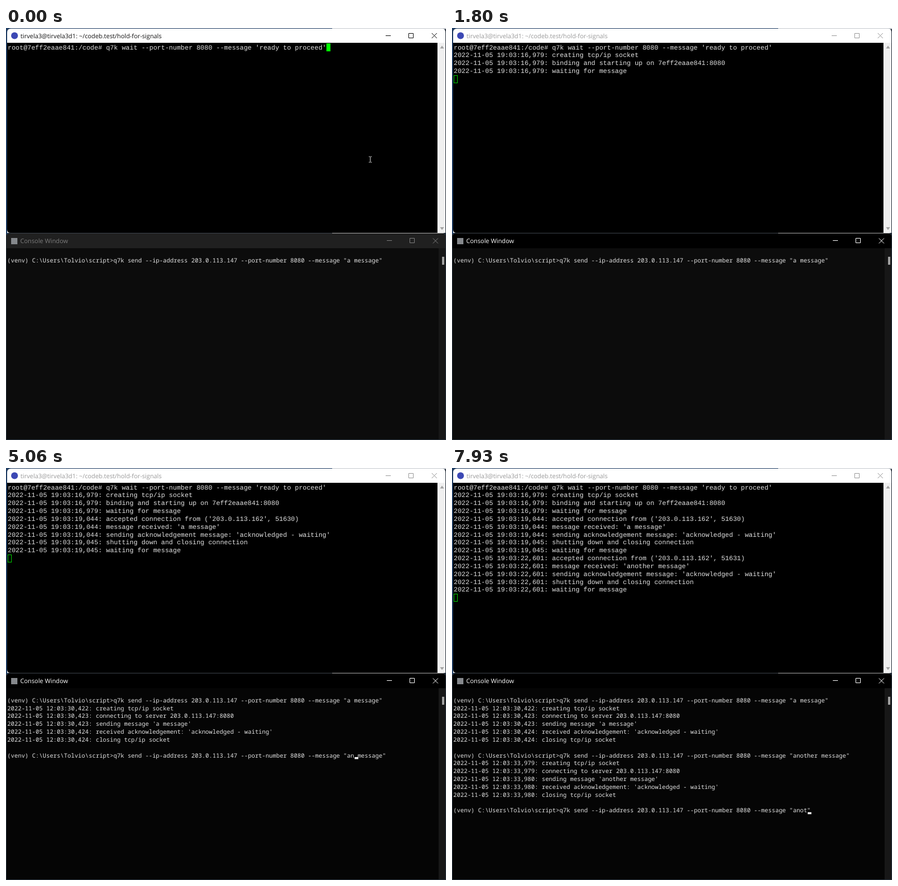
Animation, 773 px wide and 724 px high, one loop 8000 ms. Source, as an HTML page:

```html
<!DOCTYPE html>
<html lang="en">
<head>
<meta charset="utf-8">
<title>Message demo</title>
<style>
  html, body { margin: 0; width: 100%; height: 100%; overflow: hidden; background: #10151c; }
  svg { display: block; width: 773px; height: 724px; }
  text { white-space: pre; text-rendering: geometricPrecision; }
  .title { font: 10.8px "Open Sans", sans-serif; }
  .server { font: 11.52px "Liberation Mono", monospace; fill: #e2e2e2; }
  .client { font: 10.377px "Noto Sans Mono", monospace; fill: #e2e2e2; }
  .buttons { fill: none; stroke: currentColor; }
</style>
</head>
<body>
<svg viewBox="0 0 773 724">
  <rect width="773" height="724" fill="#26303b"/>
  <rect width="3" height="362" fill="#1f3d63"/>
  <rect width="573" height="2" fill="#1f3d63"/>
  <rect x="573" width="200" height="2" fill="#c4c8ce"/>
  <rect x="8" y="359" width="565" height="2" fill="#3c434b"/>
  <rect x="573" y="359" width="196" height="2" fill="#a8a8a8"/>

  <path d="M2 360V8Q2 1 9 1H766Q772 1 772 8V360Z" fill="#fff"/>
  <path d="M2 26H758V360H8Q2 360 2 354Z" fill="#000"/>
  <path d="M758 26H772V354Q772 360 766 360H758Z" fill="#f0f0f0"/>
  <path d="M762.5 36L766 31L769.5 36ZM762.5 350L766 355L769.5 350Z" fill="#a3a3a3"/>
  <circle cx="15" cy="13.5" r="6" fill="#3c48b4"/>
  <g id="topBar">
    <text class="title" x="25.5" y="17.5" fill="currentColor">tirvela3@tirvela3d1: ~/codeb.test/hold-for-signals</text>
    <path class="buttons" d="M667 13.5H676M707.5 9.5H715.5V17.5H707.5ZM748 9L757 18M757 9L748 18"/>
  </g>

  <path id="lowBack" d="M1 723V368Q1 361 8 361H766Q772 361 772 368V723Z"/>
  <path id="lowFill" d="M1 387V368Q1 361 8 361H766Q772 361 772 368V387Z"/>
  <rect x="760" y="387" width="12" height="336" fill="#171717"/>
  <rect x="766" y="402" width="4" height="14" fill="#9f9f9f"/>
  <rect x="9" y="369" width="11" height="11" fill="#85888c"/>
  <g id="lowBar">
    <text class="title" x="25" y="378" fill="currentColor">Console Window</text>
    <path class="buttons" d="M669 373.5H678M709.5 369.5H717.5V377.5H709.5ZM750 369.5L759 378.5M759 369.5L750 378.5"/>
  </g>

  <g id="server" class="server"></g>
  <g id="client" class="client"></g>
  <rect id="block"/>
  <rect id="caret" width="6.5" height="3.5" fill="#f2f2f2"/>
  <g id="mouse">
    <path id="beam" d="M-2.5 -5H-.5M.5 -5H2.5M0 -4.5V4.5M-2.5 5H-.5M.5 5H2.5" stroke="#e8e8e8" fill="none"/>
    <path id="arrow" d="M0 0V11L2.5 8.7L4.3 13L6.2 12.2L4.4 8H7.8Z" fill="#fff" stroke="#000" stroke-width=".5"/>
  </g>
</svg>
<script>
const LOOP = 8000, ROW = 13.83, TOP_CELL = 6.913, LOW_CELL = 6.226, LOW_X = 2.3;
const $ = id => document.getElementById(id);

const stamp = (clock, text) => `2022-11-05 ${clock}: ${text}`;
const ack = "'acknowledged - waiting'";

const serverRound = (a, b, port, msg) => [
  stamp(a, `accepted connection from ('203.0.113.162', ${port})`),
  stamp(a, `message received: '${msg}'`),
  stamp(a, `sending acknowledgement message: ${ack}`),
  stamp(b, 'shutting down and closing connection'),
  stamp(b, 'waiting for message')
];
const clientRound = (open, connect, send, close, msg) => [
  stamp(open, 'creating tcp/ip socket'),
  stamp(connect, 'connecting to server 203.0.113.147:8080'),
  stamp(send, `sending message '${msg}'`),
  stamp(close, `received acknowledgement: ${ack}`),
  stamp(close, 'closing tcp/ip socket'),
  ''
];

const serverLog = [
  "root@7eff2eaae841:/code# q7k wait --port-number 8080 --message 'ready to proceed'",
  stamp('19:03:16,979', 'creating tcp/ip socket'),
  stamp('19:03:16,979', 'binding and starting up on 7eff2eaae841:8080'),
  stamp('19:03:16,979', 'waiting for message'),
  ...serverRound('19:03:19,044', '19:03:19,045', 51630, 'a message'),
  ...serverRound('19:03:22,601', '19:03:22,601', 51631, 'another message')
];

const prompt = '(venv) C:\\Users\\Tolvio\\script>';
const command = msg => prompt +
  (msg ? `q7k send --ip-address 203.0.113.147 --port-number 8080 --message "${msg}"` : '');
const first = clientRound('12:03:30,422', '12:03:30,423', '12:03:30,423', '12:03:30,424', 'a message');
const second = clientRound('12:03:33,979', '12:03:33,979', '12:03:33,980', '12:03:33,980', 'another message');

// Each step changes part of the state and holds until the next one.
const steps = [
  [0, { top: 1, low: 1, rowTop: 0, colTop: 81, focus: 'top', back: '#0c0c0c',
        msg: '', row: 0, col: -1, mouse: [640, 231] }],
  [120, { rowTop: 1, colTop: 0 }],
  [240, { mouse: [640, 238] }],
  [360, { mouse: [645, 272] }],
  [480, { top: 4, rowTop: 4, mouse: [654, 345] }],
  [600, { mouse: [662, 446] }],
  [720, { mouse: [668, 523] }],
  [840, { focus: 'low', mouse: [680, 584] }],
  [970, { col: 106, mouse: [690, 606] }],
  [1090, { mouse: [704, 638] }],
  [1200, { mouse: [722, 668] }],
  [1320, { mouse: [740, 690] }],
  [1440, { mouse: null }],
  [1800, { col: -1 }],
  [2280, { top: 9, rowTop: 9, low: 7 }],
  [2400, { low: 8, row: 7, col: 30 }],
  [2640, { back: '#050505' }],
  [3010, { msg: 'a message', col: 106 }],
  [3370, { col: -1 }],
  ...Array.from({ length: 8 }, (_, i) => [3490 + i * 120, { col: 105 - i }]),
  [4460, { col: 97 }],
  [4820, { col: -1 }],
  [5060, { msg: 'an message', col: 98 }],
  [5300, { msg: 'anot message', col: 100 }],
  [5420, { msg: 'anothe message', col: 102 }],
  [5540, { msg: 'another message', col: 103 }],
  [5780, { top: 14, rowTop: 14, low: 15, msg: '', row: 14, col: 30 }],
  [6270, { msg: 'another message', col: 112 }],
  [6380, { col: 111 }],
  [7220, { msg: 'another messag', col: 110 }],
  ...[7460, 7580, 7700, 7820, 7930].map((time, i) => [
    time, { msg: 'another message'.slice(0, 12 - i * 2), col: 108 - i * 2 }
  ])
];

function makeRows(group, x, y) {
  return Array.from({ length: 15 }, (_, i) => {
    const line = document.createElementNS('http://www.w3.org/2000/svg', 'text');
    attrs(line, { x, y: y + i * ROW });
    return group.appendChild(line);
  });
}
function fill(rows, lines, count) {
  rows.forEach((row, i) => {
    const text = i < count ? lines[i] || '' : '';
    if (row.textContent !== text) row.textContent = text;
  });
}
function attrs(el, values) {
  for (const key in values) el.setAttribute(key, values[key]);
}

const topRows = makeRows($('server'), 3, 37.6);
const lowRows = makeRows($('client'), LOW_X, 411.7);

function draw(t) {
  const s = Object.assign({}, ...steps.filter(([time]) => time <= t).map(step => step[1]));
  const active = s.focus === 'top';

  fill(topRows, serverLog, s.top);
  const lines = [command('a message'), ...first,
    command(s.row < 14 ? s.msg : 'another message'), ...second, command(s.msg)];
  fill(lowRows, lines, s.low);

  $('topBar').style.color = active ? '#111' : '#999';
  $('lowBar').style.color = active ? '#7c7c7c' : '#fff';
  $('lowFill').setAttribute('fill', active ? '#202020' : '#000');
  $('lowBack').setAttribute('fill', s.back);

  // The block cursor becomes an outline when its window loses focus.
  const inset = active ? 0 : 0.5;
  attrs($('block'), {
    x: 3 + s.colTop * TOP_CELL + inset,
    y: Math.round(27.3 + s.rowTop * ROW) + inset,
    width: 7 - inset * 2,
    height: 14 - inset * 2,
    fill: active ? '#00ff00' : 'none',
    stroke: active ? 'none' : '#00c800'
  });
  attrs($('caret'), {
    x: LOW_X + s.col * LOW_CELL,
    y: 411.2 + s.row * ROW,
    visibility: s.col < 0 ? 'hidden' : 'visible'
  });

  $('mouse').style.display = s.mouse ? '' : 'none';
  if (s.mouse) {
    const [x, y] = s.mouse;
    $('mouse').setAttribute('transform', `translate(${x} ${y})`);
    $('beam').style.display = y < 360 ? '' : 'none';
    $('arrow').style.display = y < 360 ? 'none' : '';
  }
}

const start = performance.now();
function tick() {
  draw((performance.now() - start) % LOOP);
  requestAnimationFrame(tick);
}
tick();
</script>
</body>
</html>
```
